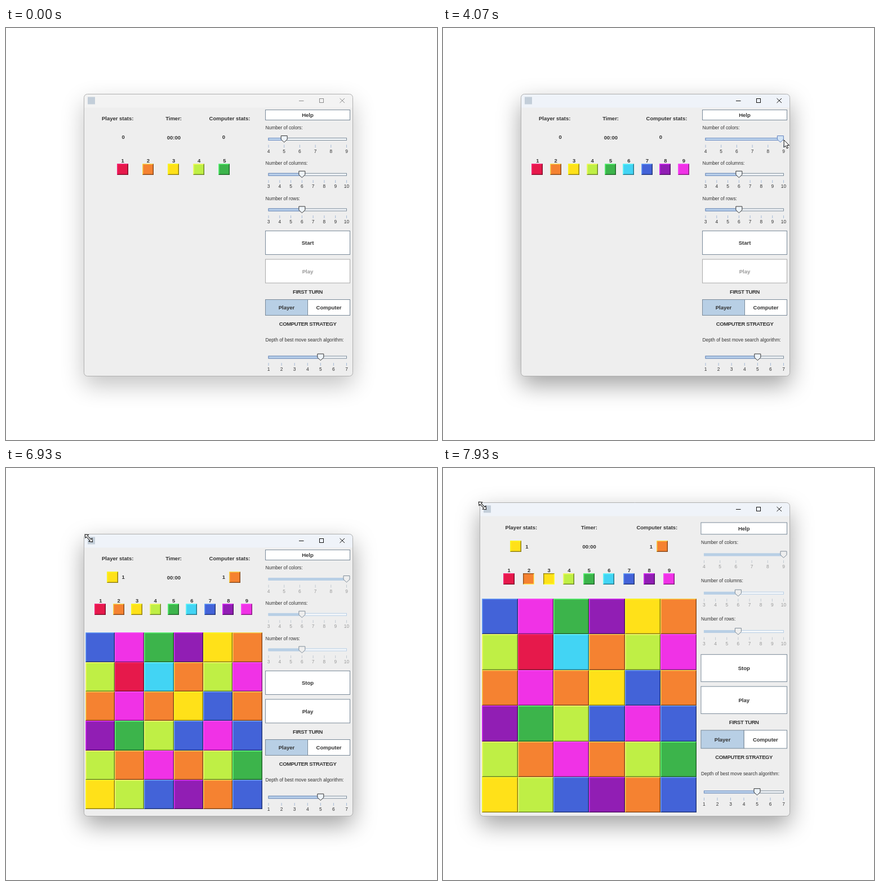
An HTML page with a canvas for the animation above (8 s loop, 765x732 px).

```html
<!DOCTYPE html>
<html lang="en">
<head>
<meta charset="utf-8">
<title>Colour board game</title>
<style>
html, body { margin: 0; width: 100%; height: 100%; overflow: hidden; background: #fff; }
canvas { display: block; }
</style>
</head>
<body>
<canvas id="stage" width="765" height="732"></canvas>
<script>
const ctx = document.getElementById('stage').getContext('2d');
const LOOP = 8000, STEP = 1000 / 15;
const FAMILY = '"Liberation Sans", Arial, sans-serif';
const INK = '#333', EDGE = '#7a8a99', PALE = '#b8cfe5', DIM = '#999';
const LEFT = 138.5, TOP = 117.5, RIGHT = 615.5, BOTTOM = 618.5;
const GRIP = { x: 143, y: 123 };
const COLORS = ['e6194b', 'f58231', 'ffe119', 'bfef45', '3cb44b', '42d4f4', '4363d8', '911eb4', 'f032e6']
  .map(hex => hex.match(/../g).map(part => parseInt(part, 16)));
const BOARD = ['795832', '416249', '292372', '854797', '429245', '347827'];

const smooth = u => u * u * (3 - 2 * u);
const linear = u => u;
const clamp = v => Math.min(1, Math.max(0, v));

// The pointer rests between moves.
const MOVES = [
  { from: 67, to: 267, x: 586, y: 614 },
  { from: 467, to: 1267, x: 494, y: 195 },
  { from: 1867, to: 2267, x: 474, y: 199 },
  { from: 2680, to: 4350, x: 632, y: 199, ease: linear },
  { from: 4600, to: 5067, x: 549, y: 382 },
  { from: 5667, to: 6067, x: 306, y: 192 },
  { from: 6267, to: 7000, ...GRIP },
  { from: 7340, to: 7667, x: 70, y: 67 }
];

function pointer(t) {
  let x = 720, y = 740;
  for (const m of MOVES) {
    const u = (m.ease || smooth)(clamp((t - m.from) / (m.to - m.from)));
    x += (m.x - x) * u;
    y += (m.y - y) * u;
  }
  return { x, y };
}

function text(str, x, y, { color = INK, small = false, align = 'center', spacing = 0 } = {}) {
  ctx.font = (small ? '8.4px ' : 'bold 9.5px ') + FAMILY;
  ctx.letterSpacing = spacing + 'px';
  ctx.textAlign = align;
  ctx.fillStyle = color;
  ctx.fillText(str, x, y + (small ? 2.8 : 3.5));
}

function poly(points, fill, stroke) {
  ctx.beginPath();
  points.forEach(([x, y]) => ctx.lineTo(x, y));
  ctx.closePath();
  ctx.fillStyle = fill;
  ctx.fill();
  if (!stroke) return;
  ctx.strokeStyle = stroke;
  ctx.stroke();
}

function line(x1, y1, x2, y2, color) {
  ctx.strokeStyle = color;
  ctx.beginPath();
  ctx.moveTo(x1, y1);
  ctx.lineTo(x2, y2);
  ctx.stroke();
}

function rect(x, y, w, h, fill, stroke) {
  ctx.fillStyle = fill;
  ctx.fillRect(x, y, w, h);
  if (!stroke) return;
  ctx.strokeStyle = stroke;
  ctx.strokeRect(x, y, w, h);
}

function button(label, x, y, w, h, { fill = '#fff', enabled = true, hover = false } = {}) {
  rect(x, y, w, h, fill, enabled ? EDGE : '#aaa');
  if (hover) {
    ctx.strokeStyle = '#a3bdd8';
    ctx.strokeRect(x + 1, y + 1, w - 2, h - 2);
  }
  text(label, x + w / 2, y + h / 2, { color: enabled ? INK : DIM });
}

const shade = (color, k) => `rgb(${color.map(v => Math.min(255, Math.round(v * k)))})`;

// A bevelled square on whole pixels; its two rings are one and two shades off.
function tile(n, x, y, size, pressed) {
  const color = COLORS[n - 1], left = Math.round(x), top = Math.round(y);
  const w = Math.round(x + size) - left, h = Math.round(y + size) - top;
  for (let i = 0; i < 2; i++) {
    const d = 0.8 * i, x1 = left + d, y1 = top + d, x2 = left + w - d, y2 = top + h - d;
    const dark = 0.7 ** (2 - i), light = 1 / dark;
    rect(x1, y1, x2 - x1, y2 - y1, shade(color, pressed ? light : dark));
    poly([[x1, y1], [x2, y1], [x2 - 2, y1 + 2], [x1 + 2, y2 - 2], [x1, y2]], shade(color, pressed ? dark : light));
  }
  rect(left + 1.6, top + 1.6, w - 3.2, h - 3.2, shade(color, 1));
}

function slider(label, panel, labelY, y, min, max, pos, { enabled = true, focus = false } = {}) {
  const x1 = panel + 5.5, x2 = 604.5, at = u => x1 + (x2 - x1) * u, x = at(pos);
  text(label, panel, labelY, { small: true, align: 'left' });
  rect(x1, y - 2, x2 - x1, 4, '#f4f7fa', enabled ? EDGE : PALE);
  if (enabled) rect(x1, y - 2, x - x1, 4, '#bdd3ec', '#6f8fc4');
  else rect(x1 - 0.5, y - 2.2, x - x1, 4.5, PALE);
  for (let v = min; v <= max; v++) {
    const tx = at((v - min) / (max - min));
    line(tx, y + 10, tx, y + 15, enabled ? '#a3b8d5' : '#c0c8d0');
    text(v, tx, y + 21.2, { small: true, color: enabled ? INK : DIM });
  }
  const edge = !enabled ? '#7f8c98' : focus ? '#6382bf' : '#333';
  const fill = !enabled ? '#eee' : focus ? '#d3e4f5' : '#edf3f9';
  poly([[x - 5.5, y - 6], [x + 5.5, y - 6], [x + 5.5, y + 0.5], [x, y + 5.5], [x - 5.5, y + 0.5]], fill, edge);
}

// slack is the spare room that a larger window gives to each gap.
function content(x0, y0, slack, s) {
  x0 += slack;
  y0 += slack - 0.5;
  const stretch = 1 + slack / 10;
  const cell = 52.32 + slack * 7.4, mid = x0 + 2.1 + 3 * cell;
  const spread = cell * 1.9, statY = y0 + 76.5, score = s.game ? 1 : 0;
  ['Player stats:', 'Timer:', 'Computer stats:'].forEach((h, i) => text(h, mid + (i - 1) * spread, y0 + 43));
  text(score, mid - spread + 10, statY);
  text('00:00', mid + 0.3, statY + 0.5);
  text(score, mid + spread - 10.5, statY);
  if (s.game) {
    tile(3, mid - spread - 19.5, statY - 10, 20);
    tile(2, mid + spread - 0.5, statY - 10, 20);
    const top = y0 + 175.3 - slack * 3.9;
    BOARD.forEach((row, r) => [...row].forEach((n, c) => tile(+n, mid + (c - 3) * cell, top + r * cell, cell)));
  }
  const gap = (250 + 4 * cell) / (s.count + 5.16);
  for (let i = 1; i <= s.count; i++) {
    const x = mid + (i - (s.count + 1) / 2) * gap;
    text(i, x, y0 + 118.5);
    tile(i, Math.floor(x - 10), y0 + 124, 20, s.inset && (i === 2 || i === 3));
  }

  // The side panel stacks downwards.
  const x = 460.5 - slack * 1.7, w = 610.5 - x, caps = { spacing: -0.37 };
  const pitch = 62.75 + 3.7 * slack, tall = 42 * stretch;
  let y = y0 + 28.5 + 4 * slack;
  button('Help', x, y, w, 18 * stretch);
  y += 18 * stretch + 14;
  const row = (label, i, min, max, pos, focus) =>
    slider(label, x, y + i * pitch, y + i * pitch + 20 + 1.5 * slack, min, max, pos, { enabled: !s.game, focus });
  row('Number of colors:', 0, 4, 9, s.knob, s.focus);
  row('Number of columns:', 1, 3, 10, 3 / 7);
  row('Number of rows:', 2, 3, 10, 3 / 7);
  y += 3 * pitch - 5.25;
  button(s.game ? 'Stop' : 'Start', x, y, w, tall, { fill: s.pressed ? PALE : '#fff', hover: s.hover });
  y += tall + 8.5;
  button('Play', x, y, w, tall, { enabled: s.game });
  y += tall + 15;
  text('FIRST TURN', x + w / 2, y, caps);
  y += 14.5;
  button('Player', x, y, w / 2, 28 * stretch, { fill: PALE });
  button('Computer', x + w / 2, y, w / 2, 28 * stretch);
  y += 28 * stretch + 15;
  text('COMPUTER STRATEGY', x + w / 2, y, caps);
  y += 28.5 + slack;
  slider('Depth of best move search algorithm:', x, y, y + 31 + slack, 1, 7, 4 / 6);
}

function frame(left, top, active) {
  const w = RIGHT - left, h = BOTTOM - top;
  ctx.save();
  ctx.shadowColor = `rgba(0,0,0,${active ? 0.37 : 0.24})`;
  ctx.shadowBlur = 42;
  ctx.shadowOffsetY = 16;
  ctx.fillStyle = '#eee';
  ctx.beginPath();
  ctx.roundRect(left, top, w, h, 6);
  ctx.fill();
  ctx.restore();
  ctx.save();
  ctx.clip();
  rect(left, top, w, 24, active ? '#eff3f9' : '#f3f3f3');
  ctx.restore();
  ctx.strokeStyle = '#b0b0b0';
  ctx.stroke();
  rect(left + 6.5, top + 5, 13, 13, '#c3ced9');
  const y = top + 11.5, ink = active ? '#111' : '#8c8c8c';
  line(520, y + 0.5, 528.5, y + 0.5, ink);
  ctx.strokeRect(556.5, y - 3.5, 7, 7);
  line(592.5, y - 4, 601, y + 4, ink);
  line(592.5, y + 4, 601, y - 4, ink);
}

// Unpainted corners seen while the window is being resized.
function tearing(left) {
  rect(left, 601, 17, 17, '#000');
  rect(left + 1.5, 601, 15.5, 7, '#fff');
  rect(left + 10, 608, 7, 6.5, '#fff');
  for (let i = 0; i < 8; i++) rect(590 + 3 * i, 123, 3.2, 3 + 1.7 * i + (i % 2) * 3, '#fff');
}

function drawPointer({ x, y }, resize) {
  ctx.save();
  ctx.translate(x, y);
  if (resize) {
    ctx.rotate(Math.PI / 4);
    const half = [[-9.5, 0], [-4.5, -4], [-4.5, -1.3], [4.5, -1.3], [4.5, -4]];
    poly([...half, ...half.map(([a, b]) => [-a, -b])], '#fff', '#111');
  } else {
    poly([[0, 0], [0, 13], [3, 10.3], [5.2, 15], [7.3, 14], [5.1, 9.4], [9.3, 9.4]], '#fff', '#111');
  }
  ctx.restore();
}

function render() {
  const t = Math.floor((performance.now() % LOOP) / STEP + 0.1) * STEP;
  // The program's window repaints one step behind the pointer.
  const tip = pointer(t), lag = pointer(t - STEP);
  const after = time => t > time - STEP / 2;
  const resizing = after(7333);
  const dx = resizing ? Math.round(lag.x - GRIP.x) : 0;
  const dy = resizing ? Math.round(lag.y - GRIP.y) : 0;
  const knob = after(4333) ? 1 : after(1933) ? clamp((lag.x - 466) / 138.5) : 0.2;
  const game = after(5533);
  const state = {
    knob, game,
    count: Math.round(4 + 5 * knob),
    pressed: after(5333) && !game,
    focus: after(1467) && !after(5333),
    hover: !resizing && tip.x > 460 && tip.x < 611 && tip.y > 360 && tip.y < 403,
    inset: after(7867)
  };

  ctx.lineWidth = 1;
  rect(0, 0, 765, 732, '#fff');
  frame(LEFT + dx, TOP + dy, after(1467));
  if (after(7733)) {
    content(LEFT + dx, TOP + dy, 1.5, state);
  } else {
    ctx.save();
    ctx.translate(dx, dy);
    content(LEFT, TOP, 0, state);
    ctx.restore();
    if (after(7467)) tearing(LEFT + dx);
  }
  if (after(133)) drawPointer(tip, after(6733));
  requestAnimationFrame(render);
}
render();
</script>
</body>
</html>
```
